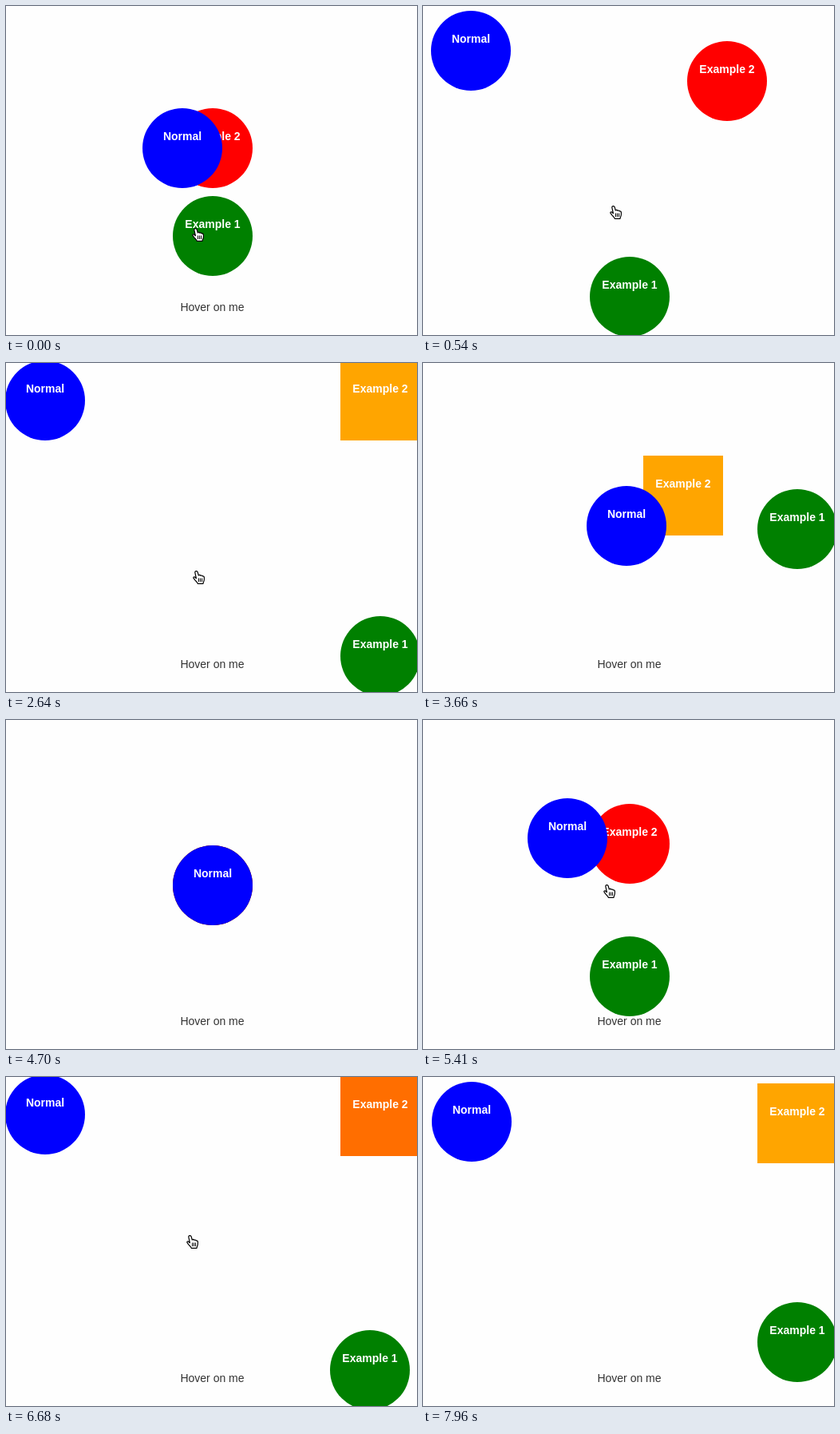
Write an HTML page with a canvas that moves like this. It is 515 px wide and 412 px high and loops after 8 s.

```html
<!DOCTYPE html>
<html lang="en">
<head>
<meta charset="utf-8">
<title>Transition timing</title>
<style>
  html, body { margin: 0; width: 100%; height: 100%; overflow: hidden; background: #fefefe; }
  canvas { display: block; }
</style>
</head>
<body>
<canvas id="stage" width="515" height="412"></canvas>
<script>
const ctx = document.getElementById('stage').getContext('2d');
const LOOP = 8;
const SIZE = 100;
const FONT = '14px "Liberation Sans", Arial, sans-serif';
const HOME = { x: 209, y: 157 };
const EDGE = { left: -1, top: -3, right: 419, bottom: 317 };

// Pointer visits: seconds of entering and leaving, and where the pointer rests
const visits = [
  { enter: -0.295, leave: 2.763, x: 234, y: 250 },
  { enter: 4.987, leave: 7.794, x: 226, y: 198 }
];

const hand = new Path2D(
  'M4 .7C5.4 .3 6 1.2 6.3 2.3L7.3 6C8 5.2 9.3 5.2 9.8 6.3C10.8 5.7 11.8 6 12.2 7' +
  'C13.6 6.7 14.3 7.5 14.4 8.8L14.3 11.5C14.2 13 13.2 14 13 16.3L6.2 16.3' +
  'C6 14.5 4 13.6 2.6 11.7L1 9.4C.3 8.2 1.8 7.3 2.9 8.3L4.4 9.7L2.9 2.8C2.6 1.7 3 .9 4 .7Z');
const knuckles = new Path2D('M7.5 9.5V14M9.5 9.5V14M11.5 9.5V14');

const clamp = v => Math.min(1, Math.max(0, v));
const mix = (a, b, k) => a + (b - a) * k;

function bezier(x1, y1, x2, y2) {
  const curve = (a, b, s) => 3 * a * s * (1 - s) ** 2 + 3 * b * s * s * (1 - s) + s ** 3;
  return x => {
    if (x <= 0 || x >= 1) return clamp(x);
    let low = 0, high = 1;
    for (let i = 0; i < 24; i++) {
      const mid = (low + high) / 2;
      if (curve(x1, x2, mid) < x) low = mid; else high = mid;
    }
    return curve(y1, y2, low);
  };
}
const ease = bezier(0.25, 0.1, 0.25, 1);
const easeInOut = bezier(0.42, 0, 0.58, 1);

const lastVisit = t => visits.filter(v => v.enter <= t).pop();

// Progress of one property from its resting to its hovered value
function progress(t, duration, delay = 0, easing = ease) {
  const { enter, leave } = lastVisit(t);
  const run = start => easing(clamp((t - start - delay) / duration));
  return t < leave ? run(enter) : 1 - run(leave);
}

function drawBox(label, color, left, top, radius = SIZE / 2) {
  const x = Math.round(left), y = Math.round(top);
  ctx.fillStyle = color;
  ctx.beginPath();
  ctx.roundRect(x, y, SIZE, SIZE, radius);
  ctx.fill();
  ctx.fillStyle = '#fff';
  ctx.font = 'bold ' + FONT;
  ctx.fillText(label, x + SIZE / 2, y + 40);
}

// The pointer glides in from below the stage, rests, and speeds out the same way
function drawPointer(t) {
  const { enter, leave, x, y } = lastVisit(t);
  if (t >= leave) return;
  const away = 1 - ease(clamp((t - enter) / 0.56)) + clamp(1 - (leave - t) / 0.2) ** 3;
  ctx.save();
  ctx.translate(Math.round(mix(x, 228, away)), Math.round(mix(y, 412, away)));
  ctx.fillStyle = '#fff';
  ctx.strokeStyle = '#000';
  ctx.lineJoin = 'round';
  ctx.lineWidth = 1.2;
  ctx.fill(hand);
  ctx.stroke(hand);
  ctx.lineWidth = 1;
  ctx.stroke(knuckles);
  ctx.restore();
}

function draw(t) {
  ctx.fillStyle = '#fefefe';
  ctx.fillRect(0, 0, 515, 412);
  ctx.textAlign = 'center';
  ctx.fillStyle = '#333';
  ctx.font = FONT;
  ctx.fillText('Hover on me', 258.5, 382);

  // Down first, then right
  drawBox('Example 1', '#008000',
    mix(HOME.x, EDGE.right, progress(t, 1, 1)),
    mix(HOME.y, EDGE.bottom, progress(t, 1)));

  // Position, shape and colour overlap in turn
  drawBox('Example 2', `rgb(255, ${Math.round(165 * progress(t, 0.5, 1.5))}, 0)`,
    mix(HOME.x, EDGE.right, progress(t, 1, 0.5)),
    mix(HOME.y, EDGE.top, progress(t, 2)),
    mix(SIZE / 2, 0, progress(t, 0.5, 1)));

  const k = progress(t, 1, 0, easeInOut);
  drawBox('Normal', '#0000ff', mix(HOME.x, EDGE.left, k), mix(HOME.y, EDGE.top, k));

  drawPointer(t);
}

const begin = performance.now();
function tick() {
  draw((performance.now() - begin) / 1000 % LOOP);
  requestAnimationFrame(tick);
}
tick();
</script>
</body>
</html>
```
